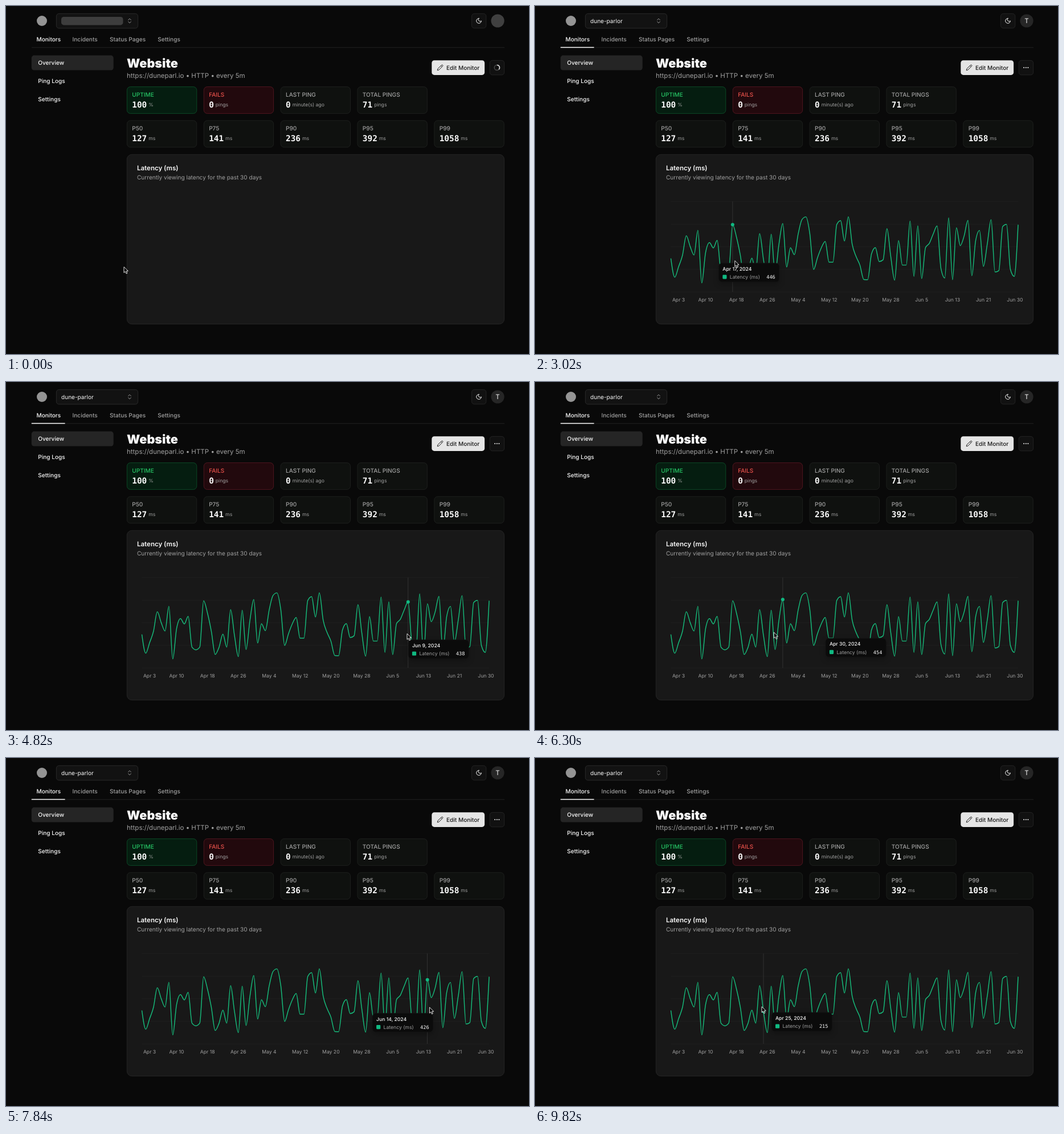
An HTML page that plays this animation: 918x610 px, repeating every 9850 ms.

```html
<!DOCTYPE html>
<html lang="en">
<head>
<meta charset="utf-8">
<title>Monitor overview</title>
<style>
html, body { margin: 0; width: 100%; height: 100%; overflow: hidden; background: #090909; }
svg { display: block; }
text { font-family: Inter, sans-serif; text-rendering: geometricPrecision; white-space: pre; }
.mono { font-family: "DejaVu Sans Mono", "Noto Sans Mono", monospace; }
.icon { fill: none; stroke-width: 2; stroke-linecap: round; stroke-linejoin: round; }
</style>
</head>
<body>
<svg id="stage" width="918" height="610" viewBox="0 0 918 610"></svg>
<script>
const LOOP = 9850, LOADED = 40, DRAW = 1500;
const GREEN = '#10b981', WHITE = '#fafafa', GREY = '#a1a1a1', EDGE = '#2a2a2a';
const SM = 10.09, BASE = 11.53, XS = 8.64;
const stage = document.getElementById('stage');

function add(parent, tag, attrs) {
  const el = document.createElementNS('http://www.w3.org/2000/svg', tag);
  for (const k in attrs) el.setAttribute(k, attrs[k]);
  parent.appendChild(el);
  return el;
}
const group = parent => add(parent, 'g', {});
function text(parent, str, x, y, size, fill, weight = 400, extra = {}) {
  const el = add(parent, 'text', { x, y, 'font-size': size, fill, 'font-weight': weight, ...extra });
  el.textContent = str;
  return el;
}
function box(parent, x, y, w, h, r, fill, stroke) {
  const a = { x, y, width: w, height: h, rx: r, fill };
  if (stroke) Object.assign(a, { stroke, 'stroke-width': 0.8 });
  return add(parent, 'rect', a);
}
function icon(parent, cx, cy, stroke, ...paths) {
  const g = add(parent, 'g', { class: 'icon', stroke, transform: `translate(${cx - 5.76} ${cy - 5.76}) scale(.48)` });
  paths.forEach(d => add(g, 'path', { d }));
}
const show = (el, on) => el.setAttribute('visibility', on ? 'visible' : 'hidden');
const clamp = (v, lo, hi) => Math.max(lo, Math.min(hi, v));

// Tangents of a monotone cubic through [x, y] points
function tangents(p) {
  const n = p.length, m = [];
  const slope = i => (p[i + 1][1] - p[i][1]) / (p[i + 1][0] - p[i][0]);
  for (let i = 1; i < n - 1; i++) {
    const a = slope(i - 1), b = slope(i);
    const h0 = p[i][0] - p[i - 1][0], h1 = p[i + 1][0] - p[i][0];
    const mid = (a * h1 + b * h0) / (h0 + h1);
    m[i] = (Math.sign(a) + Math.sign(b)) * Math.min(Math.abs(a), Math.abs(b), Math.abs(mid) / 2);
  }
  m[0] = (3 * slope(0) - m[1]) / 2;
  m[n - 1] = (3 * slope(n - 2) - m[n - 2]) / 2;
  return m;
}
function track(p) {
  const m = tangents(p), n = p.length;
  return t => {
    if (t <= p[0][0]) return p[0][1];
    if (t >= p[n - 1][0]) return p[n - 1][1];
    let i = 0;
    while (t > p[i + 1][0]) i++;
    const h = p[i + 1][0] - p[i][0], u = (t - p[i][0]) / h, v = 1 - u;
    return p[i][1] * v * v * (1 + 2 * u) + p[i + 1][1] * u * u * (3 - 2 * u)
      + h * u * v * (m[i] * v - m[i + 1] * u);
  };
}
// cubic-bezier(.25, .1, .25, 1)
function ease(x) {
  if (x <= 0) return 0;
  if (x >= 1) return 1;
  let lo = 0, hi = 1, s = 0.5;
  for (let i = 0; i < 30; i++) {
    s = (lo + hi) / 2;
    const bx = 0.75 * s * (1 - s) + s * s * s;
    if (bx < x) lo = s; else hi = s;
  }
  return 0.3 * s * (1 - s) * (1 - s) + 3 * s * s * (1 - s) + s * s * s;
}

// Header
add(stage, 'circle', { cx: 63, cy: 26, r: 9, fill: '#949494' });
box(stage, 88.4, 13.4, 143.2, 25.6, 4.5, '#121212', '#303030');
icon(stage, 217, 26, GREY, 'm7 15 5 5 5-5', 'm7 9 5-5 5 5');
box(stage, 817.4, 13.4, 25.4, 25.4, 4.5, '#111', EDGE);
icon(stage, 830, 26, WHITE, 'M12 3a6 6 0 0 0 9 9 9 9 0 1 1-9-9Z');
text(stage, 'Monitors', 53.5, 62, SM, WHITE, 500);
text(stage, 'Incidents', 116.5, 62, SM, GREY, 500);
text(stage, 'Status Pages', 182, 62, SM, GREY, 500);
text(stage, 'Settings', 266.3, 62, SM, GREY, 500);
box(stage, 45, 72.4, 830, 0.9, 0, '#242424');

// Sidebar
box(stage, 44.8, 86.6, 143.9, 25.9, 4.5, '#252525');
['Overview', 'Ping Logs', 'Settings'].forEach((s, i) => text(stage, s, 56.3, 103.2 + 31.7 * i, SM, WHITE, 500));

// Title row
text(stage, 'Website', 212, 107.8, 21.6, WHITE, 900);
text(stage, 'https://duneparl.io • HTTP • every 5m', 212, 125.6, BASE, GREY);
box(stage, 747.3, 95.2, 92.8, 25.7, 4.5, '#e5e5e5');
icon(stage, 762, 108, '#171717', 'M17 3a2.85 2.83 0 1 1 4 4L7.5 20.5 2 22l1.5-5.5Z', 'm15 5 4 4');
text(stage, 'Edit Monitor', 773, 111.7, SM, '#171717', 500);
box(stage, 849.2, 95.4, 25.4, 25.4, 4.5, '#111', EDGE);

// Stat cards
function card(col, y, label, value, unit, ink = GREY, fill = '#0f110f', edge = '#232523') {
  const x = 212 + 134.85 * col, tx = x + 9.3;
  box(stage, x + 0.4, y + 0.4, 122.4, 46.8, 6, fill, edge);
  text(stage, label, tx, y + 17.4, SM, ink, 500);
  text(stage, value, tx, y + 36.4, 14.4, WHITE, 700, { class: 'mono' });
  text(stage, unit, tx + 8.65 * value.length + 3, y + 34.8, XS, GREY);
}
card(0, 141.2, 'UPTIME', '100', '%', '#26c565', '#051d10', '#0e552c');
card(1, 141.2, 'FAILS', '0', 'pings', '#e5504a', '#22090d', '#5e1a25');
card(2, 141.2, 'LAST PING', '0', 'minute(s) ago');
card(3, 141.2, 'TOTAL PINGS', '71', 'pings');
card(0, 200.4, 'P50', '127', 'ms');
card(1, 200.4, 'P75', '141', 'ms');
card(2, 200.4, 'P90', '236', 'ms');
card(3, 200.4, 'P95', '392', 'ms');
card(4, 200.4, 'P99', '1058', 'ms');

// Chart card
box(stage, 212.3, 260.3, 662.2, 297.2, 8.6, '#181818', EDGE);
text(stage, 'Latency (ms)', 230, 287.6, BASE, WHITE, 600);
text(stage, 'Currently viewing latency for the past 30 days', 230, 304.4, SM, GREY);

// Loading placeholders
const loading = group(stage);
box(loading, 97, 19, 108.5, 14.4, 4.5, '#3d3d3d');
add(loading, 'circle', { cx: 863, cy: 26, r: 11.6, fill: '#404040' });
add(loading, 'circle', { cx: 861.8, cy: 108, r: 4.6, fill: 'none', stroke: '#4a4a4a', 'stroke-width': 1.5 });
const spinner = add(loading, 'path', {
  d: 'M0 -4.6A4.6 4.6 0 0 1 3.2 3.3', fill: 'none', stroke: '#e5e5e5', 'stroke-width': 1.5
});

// Loaded content
const ready = group(stage);
text(ready, 'dune-parlor', 97, 29.7, SM, WHITE);
add(ready, 'circle', { cx: 863, cy: 26, r: 11.6, fill: '#262626' });
text(ready, 'T', 863, 30, BASE, WHITE, 400, { 'text-anchor': 'middle' });
box(ready, 44.8, 71.8, 58.8, 1.5, 0, WHITE);
for (let i = -1; i < 2; i++) add(ready, 'circle', { cx: 861.8 + 3.6 * i, cy: 108, r: 1, fill: WHITE });

// Daily latency, April to June
const data = [
  222, 97, 167, 242, 373, 301, 245, 409, 59, 261, 327, 292, 342, 137, 120,
  138, 446, 364, 243, 89, 137, 224, 138, 387, 215, 75, 383, 122, 315, 454,
  165, 293, 247, 385, 481, 498, 388, 149, 227, 293, 335, 197, 197, 448, 473,
  338, 499, 315, 235, 177, 82, 81, 252, 294, 201, 213, 420, 233, 78, 340, 178,
  178, 470, 103, 439, 88, 294, 323, 385, 438, 155, 92, 492, 81, 426, 307,
  371, 475, 107, 341, 408, 169, 317, 480, 132, 141, 434, 448, 149, 103, 446
];
const X0 = 238.5, W = 609.5, STEP = W / 90, TOP = 342.7, BOTTOM = 501.1;
const px = i => X0 + STEP * i;
const py = v => BOTTOM - (BOTTOM - TOP) * v / 600;
function label(i) {
  const d = new Date(2024, 3, 1 + i);
  return ['Apr', 'May', 'Jun'][d.getMonth() - 3] + ' ' + d.getDate();
}
const tick = (i, x) => text(ready, label(i), x, 517.7, XS, GREY, 400, { 'text-anchor': 'middle' });

for (let i = 0; i < 5; i++) box(ready, X0, TOP + 39.6 * i - 0.4, W, 0.8, 0, '#202020');
tick(2, px(2));
for (let i = 9; i < 88; i += 8) tick(i, px(i));
tick(90, 842.4);

const rule = box(ready, 0, TOP, 0.8, BOTTOM - TOP, 0, '#393939');
const pts = data.map((v, i) => [px(i), py(v)]), tan = tangents(pts);
let d = `M${pts[0]}`;
for (let i = 1; i < pts.length; i++) {
  const [xa, ya] = pts[i - 1], [xb, yb] = pts[i], h = STEP / 3;
  d += `C${xa + h} ${ya + h * tan[i - 1]} ${xb - h} ${yb - h * tan[i]} ${xb} ${yb}`;
}
const line = add(ready, 'path', { d, fill: 'none', stroke: '#16bd7c', 'stroke-width': 1.44, pathLength: 1 });
const dot = add(ready, 'circle', { r: 3, fill: GREEN });

// Tooltip
const tip = group(stage);
tip.style.filter = 'drop-shadow(0 4px 5px rgba(0,0,0,.25))';
box(tip, 0.3, 0.3, 106, 32.8, 5.8, '#0b0b0b', '#131313');
const tipDate = text(tip, '', 7, 13.3, XS, WHITE, 500);
box(tip, 7, 20.8, 7.2, 7.2, 1.4, GREEN);
text(tip, 'Latency (ms)', 19.5, 27.7, XS, GREY);
const tipValue = text(tip, '', 99.5, 27.7, XS, WHITE, 500, { class: 'mono', 'text-anchor': 'end' });

const pointer = add(stage, 'path', {
  d: 'M0 0V10.2L2.4 8 4 11.8 5.8 11 4.3 7.4 7.3 7.2Z',
  fill: '#000', stroke: '#fff', 'stroke-width': 0.9, 'stroke-linejoin': 'round'
});

// The mouse sweeps between a few stops and slowly drifts upwards
const mouseX = track([[1900, 207], [2500, 225], [3020, 350.8], [3700, 353], [4550, 704], [5500, 704],
  [6300, 419.6], [6650, 300], [7300, 420], [7840, 743.4], [8600, 740], [9300, 398]]);
const mouseY = track([[1900, 457.3], [3020, 446.5], [7840, 437], [9300, 435.8]]);

// The active day trails the mouse; the tooltip glides after the active day
const DELAY = 40, GLIDE = 150, DT = 10, TIP_W = 106.5, GAP = 10;
const dayAt = t => clamp(Math.round((mouseX(t - DELAY) - X0) / STEP), 0, 90);
let hoverFrom = 0;
while (mouseX(hoverFrom) < X0) hoverFrom += DT;

const glide = [[230, 335]];
for (let t = hoverFrom; t < LOOP; t += DT) {
  const [x, y] = glide[glide.length - 1], at = px(dayAt(t)), k = 1 - Math.exp(-DT / GLIDE);
  const fits = at + GAP + TIP_W < X0 + W;
  const goal = fits ? at + GAP : at - GAP - TIP_W;
  glide.push([x + (goal - x) * k, y + (mouseY(t - DELAY) + GAP - y) * k]);
}

function draw(t) {
  const on = t >= LOADED, hover = t >= hoverFrom;
  show(loading, !on);
  show(ready, on);
  spinner.setAttribute('transform', `translate(861.8 108) rotate(${t * 0.36})`);

  const p = ease((t - LOADED) / DRAW);
  line.setAttribute('stroke-dasharray', p < 1 ? `${p} 2` : 'none');

  [rule, dot, tip].forEach(el => show(el, hover));
  if (hover) {
    const i = dayAt(t);
    rule.setAttribute('x', px(i) - 0.4);
    dot.setAttribute('cx', px(i));
    dot.setAttribute('cy', py(data[i]));
    tipDate.textContent = label(i) + ', 2024';
    tipValue.textContent = data[i];
    tip.setAttribute('transform', `translate(${glide[Math.floor((t - hoverFrom) / DT)]})`);
  }
  pointer.setAttribute('transform', `translate(${mouseX(t)} ${mouseY(t)})`);
}

const start = performance.now();
function loop() {
  draw((performance.now() - start) % LOOP);
  requestAnimationFrame(loop);
}
draw(0);
requestAnimationFrame(loop);
</script>
</body>
</html>
```
